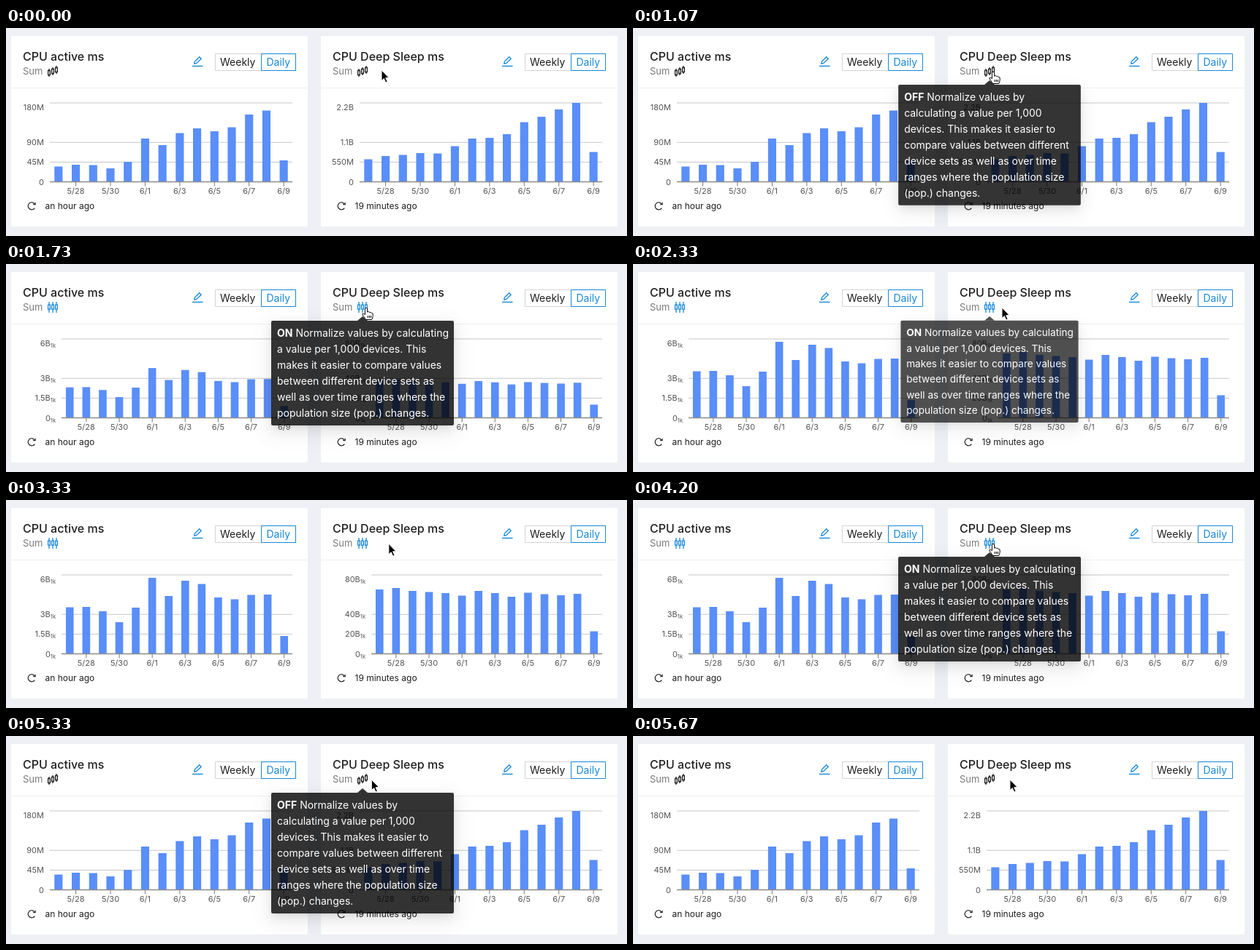
Animation, 850 px wide and 286 px high, one loop 6600 ms. Source, as an HTML page:

```html
<!DOCTYPE html>
<html lang="en">
<head>
<meta charset="utf-8">
<title>CPU charts</title>
<style>
  html, body { margin: 0; width: 100%; height: 100%; overflow: hidden; background: #eef0f5; }
  body { position: relative; font-family: Inter, sans-serif; }
  svg { position: absolute; left: 0; top: 0; }
  text { font-family: Inter, sans-serif; }
  #tip {
    position: absolute; left: 363px; top: 78px; width: 250px; box-sizing: border-box;
    padding: 6px 8px; border-radius: 2px; white-space: pre;
    font-size: 14px; line-height: 22px; color: #fff; background: rgba(0, 0, 0, .8);
    box-shadow: 0 3px 6px -4px rgba(0, 0, 0, .12), 0 6px 16px rgba(0, 0, 0, .08),
      0 9px 28px 8px rgba(0, 0, 0, .05);
    transform-origin: 125px -5px;
  }
  #tip::before {
    content: ""; position: absolute; left: 118px; top: -6px;
    border: solid transparent; border-width: 0 7px 6px; border-bottom-color: rgba(0, 0, 0, .8);
  }
</style>
</head>
<body>
<svg id="stage" width="850" height="286" viewBox="0 0 850 286"></svg>
<div id="tip"><b></b><span></span></div>
<svg id="pointer" width="850" height="286" viewBox="0 0 850 286"></svg>
<script>
const LOOP = 6600, STEP = 1000 / 15, GROW = 400;
const BASE = 211.5, TOP = 103, RIGHT = 392, BLUE = '#1788d8', INK = '#1f1f1f';
const $ = id => document.getElementById(id);

function el(parent, tag, attrs, text) {
  const node = document.createElementNS('http://www.w3.org/2000/svg', tag);
  for (const k in attrs) node.setAttribute(k, attrs[k]);
  if (text) node.textContent = text;
  parent.appendChild(node);
  return node;
}
const show = (node, on) => node.setAttribute('visibility', on ? 'visible' : 'hidden');
const clamp = v => Math.max(0, Math.min(1, v));

function bezier(x1, y1, x2, y2) {
  const at = (a, b, s) => 3 * a * s * (1 - s) ** 2 + 3 * b * s * s * (1 - s) + s ** 3;
  return x => {
    if (x <= 0 || x >= 1) return clamp(x);
    let lo = 0, hi = 1;
    for (let i = 0; i < 24; i++) {
      const mid = (lo + hi) / 2;
      if (at(x1, x2, mid) < x) lo = mid; else hi = mid;
    }
    return at(y1, y2, lo);
  };
}
const ease = bezier(.25, .1, .25, 1);
const circOut = bezier(.08, .82, .17, 1);
const circInOut = bezier(.78, .14, .15, .86);

const dates = ['5/28', '5/30', '6/1', '6/3', '6/5', '6/7', '6/9'];
const cards = [
  {
    x: 0, title: 'CPU active ms', age: 'an hour ago', swap: [1581, 4481],
    off: { labels: ['180M', '90M', '45M', '0'],
      bars: [21, 23.5, 23, 18.5, 27.5, 59.5, 50.5, 67, 73.5, 69.5, 75, 92.5, 98, 29.5] },
    on: { labels: ['6B', '3B', '1.5B', '0'],
      bars: [64, 64.5, 58.5, 43.5, 63.5, 104.5, 79.5, 100.5, 96, 77.5, 75, 81, 81.5, 24.5] }
  },
  {
    x: 424, title: 'CPU Deep Sleep ms', age: '19 minutes ago', swap: [1598, 4484],
    off: { labels: ['2.2B', '1.1B', '550M', '0'],
      bars: [31, 35.5, 37, 39.5, 39, 49, 59.5, 60.5, 65.5, 82, 89.5, 99.5, 108.5, 41] },
    on: { labels: ['80B', '40B', '20B', '0'],
      bars: [88.5, 90.5, 86.5, 85, 83.5, 80, 86.5, 83.5, 78.5, 84, 82, 80.5, 82.5, 31] }
  }
];

function chart(parent, data, normal) {
  const g = el(parent, 'g', {});
  const left = normal ? 76 : 60, pitch = (RIGHT - left) / data.bars.length;
  [1, .5, .25, 0].forEach((part, i) => {
    const y = BASE - (BASE - TOP) * part;
    if (part) el(g, 'path', { d: `M${left} ${y}H${RIGHT}`, stroke: '#c6c6c6' });
    const label = el(g, 'text', { x: left - 8, y: y + (i ? 4 : 10), 'font-size': 11,
      fill: '#555', 'text-anchor': 'end' }, data.labels[i]);
    if (normal) {
      const sub = document.createElementNS(label.namespaceURI, 'tspan');
      sub.setAttribute('font-size', 7.5);
      sub.setAttribute('dy', 2);
      sub.textContent = '1k';
      label.appendChild(sub);
    }
  });
  const width = pitch * .47;
  const rects = data.bars.map((h, i) => el(g, 'rect',
    { x: left + pitch * (i + .5) - width / 2, width, fill: '#5a8ef8' }));
  el(g, 'path', { d: `M${left} ${BASE}H${RIGHT}`, stroke: '#8a8a8a', 'stroke-width': 1.4 });
  dates.forEach((name, i) => {
    const x = left + pitch * (2 * i + 1.5);
    el(g, 'path', { d: `M${x} ${BASE}v6`, stroke: '#777' });
    el(g, 'text', { x, y: 228, 'font-size': 11, fill: '#555', 'text-anchor': 'middle' }, name);
  });
  return {
    draw(visible, grow) {
      show(g, visible);
      rects.forEach((r, i) => {
        const h = data.bars[i] * grow;
        r.setAttribute('y', BASE - h);
        r.setAttribute('height', h);
      });
    }
  };
}

// Three candles; level when normalized, rising otherwise.
function candles(parent, normal) {
  const d = [0, 1, 2].map(i => {
    const x = 59 + 5 * i, y = normal ? 56.2 : 58.5 - 2 * i;
    const top = normal ? 52 : y - 2.4, end = normal ? 67 : y + 8.5;
    return `M${x} ${top}V${y}M${x} ${y + 6}V${end}M${x - 1.4} ${y}h2.8v6h-2.8z`;
  }).join('');
  return el(parent, 'path', { d, fill: 'none', stroke: normal ? BLUE : INK, 'stroke-width': 1.3 });
}

function build(card) {
  const g = el($('stage'), 'g', { transform: `translate(${card.x})` });
  const text = (x, y, size, fill, str, weight = 400) =>
    el(g, 'text', { x, y, 'font-size': size, fill, 'font-weight': weight }, str);
  const line = (d, stroke, width = 1) =>
    el(g, 'path', { d, stroke, fill: 'none', 'stroke-width': width });

  el(g, 'rect', { x: 7, y: 11, width: 406, height: 262, rx: 2, fill: '#fff' });
  line('M7 82.5H413', '#f0f0f0');
  text(23, 45, 16, INK, card.title, 500);
  text(23, 64, 13, '#7c7c7c', 'Sum');
  line('M255 52.4H269.5', BLUE, 1.4);
  line('M257.8 49.2L258.4 46L264.7 39.7L267.2 42.2L260.9 48.5Z', BLUE, 1.3);
  line('M349 35.5H286.5V58.5H349', '#d4d4d4');
  line('M349.5 35.5H396.5V58.5H349.5Z', BLUE);
  text(293, 52, 14, INK, 'Weekly');
  text(356.5, 52, 14, BLUE, 'Daily');
  line('M39.2 241.8A5 5 0 1 0 39.3 247.6', INK, 1.2);
  line('M40.2 239.8V242.6H37.2', INK, 1.1);
  text(53.5, 249, 12, INK, card.age);
  card.icons = [candles(g, false), candles(g, true)];
  card.charts = [chart(g, card.off, false), chart(g, card.on, true)];
}
cards.forEach(build);

const arrow = el($('pointer'), 'path', {
  d: 'M0 0V14.6L3.3 11.5L5.7 17L8.1 16L5.7 10.6H10.2Z', fill: '#000', stroke: '#fff' });
const hand = el($('pointer'), 'path', {
  d: 'M-1.6 9.6V1.3Q0 -1 1.6 1.3V6Q3.6 4.8 4.6 6.6Q6.4 5.6 7.2 7.4Q9.2 7 9.2 9.2V11.5' +
    'Q9 14 7.6 16.5H-.6Q-1.5 14.5 -3 12.6L-5 9.8Q-5.6 8 -3.6 8.2ZM2.2 11v3M4.4 11v3M6.4 11v3',
  fill: '#fff', stroke: '#000', 'stroke-linejoin': 'round' });

// Pointer path: time, x, y
const path = [
  [270, 514, 58], [900, 493, 60], [2130, 493, 60], [2333, 505, 60], [2930, 528, 60],
  [3270, 528, 60], [3850, 490, 62], [3950, 493, 60], [5200, 493, 60], [5400, 504, 60],
  [5667, 516, 60]
];
function pointerAt(t) {
  const i = path.findIndex(p => p[0] > t);
  if (i < 0) return path[path.length - 1].slice(1);
  if (!i) return path[0].slice(1);
  const a = path[i - 1], b = path[i], k = (t - a[0]) / (b[0] - a[0]);
  return [a[1] + (b[1] - a[1]) * k, a[2] + (b[2] - a[2]) * k];
}

const clicks = [1380, 4280];
const hovers = [[990, 2302], [3990, 5350]];
const between = (t, [a, b]) => t >= a && t < b;

const copy = {
  OFF: ` Normalize values by
calculating a value per 1,000
devices. This makes it easier to
compare values between different
device sets as well as over time
ranges where the population size
(pop.) changes.`,
  ON: ` Normalize values by calculating
a value per 1,000 devices. This
makes it easier to compare values
between different device sets as
well as over time ranges where the
population size (pop.) changes.`
};

function drawTip(t, on) {
  const tip = $('tip'), state = on ? 'ON' : 'OFF';
  const hover = hovers.find(([a, b]) => between(t, [a, b + 100]));
  tip.style.visibility = hover ? 'visible' : 'hidden';
  if (!hover) return;
  const k = t < hover[1] ? circOut((t - hover[0]) / 100) : 1 - circInOut((t - hover[1]) / 100);
  tip.style.opacity = k;
  tip.style.transform = k < 1 ? `scale(${.8 + .2 * k})` : 'none';
  if (tip.dataset.state !== state) {
    tip.dataset.state = state;
    tip.children[0].textContent = state;
    tip.children[1].textContent = copy[state];
  }
}

function render(time) {
  const t = Math.floor((time % LOOP + 5) / STEP) * STEP;
  const on = between(t, clicks);
  for (const { icons, charts, swap } of cards) {
    const normal = between(t, swap);
    show(icons[0], !on);
    show(icons[1], on);
    charts[0].draw(!normal, t < swap[0] ? 1 : ease((t - swap[1]) / GROW));
    charts[1].draw(normal, ease((t - swap[0]) / GROW));
  }
  drawTip(t, on);
  const [x, y] = pointerAt(t), link = x < 498;
  for (const c of [arrow, hand]) c.setAttribute('transform', `translate(${x} ${y})`);
  show(arrow, !link);
  show(hand, link);
}

const start = performance.now();
function tick() {
  render(performance.now() - start);
  requestAnimationFrame(tick);
}
tick();
</script>
</body>
</html>
```
